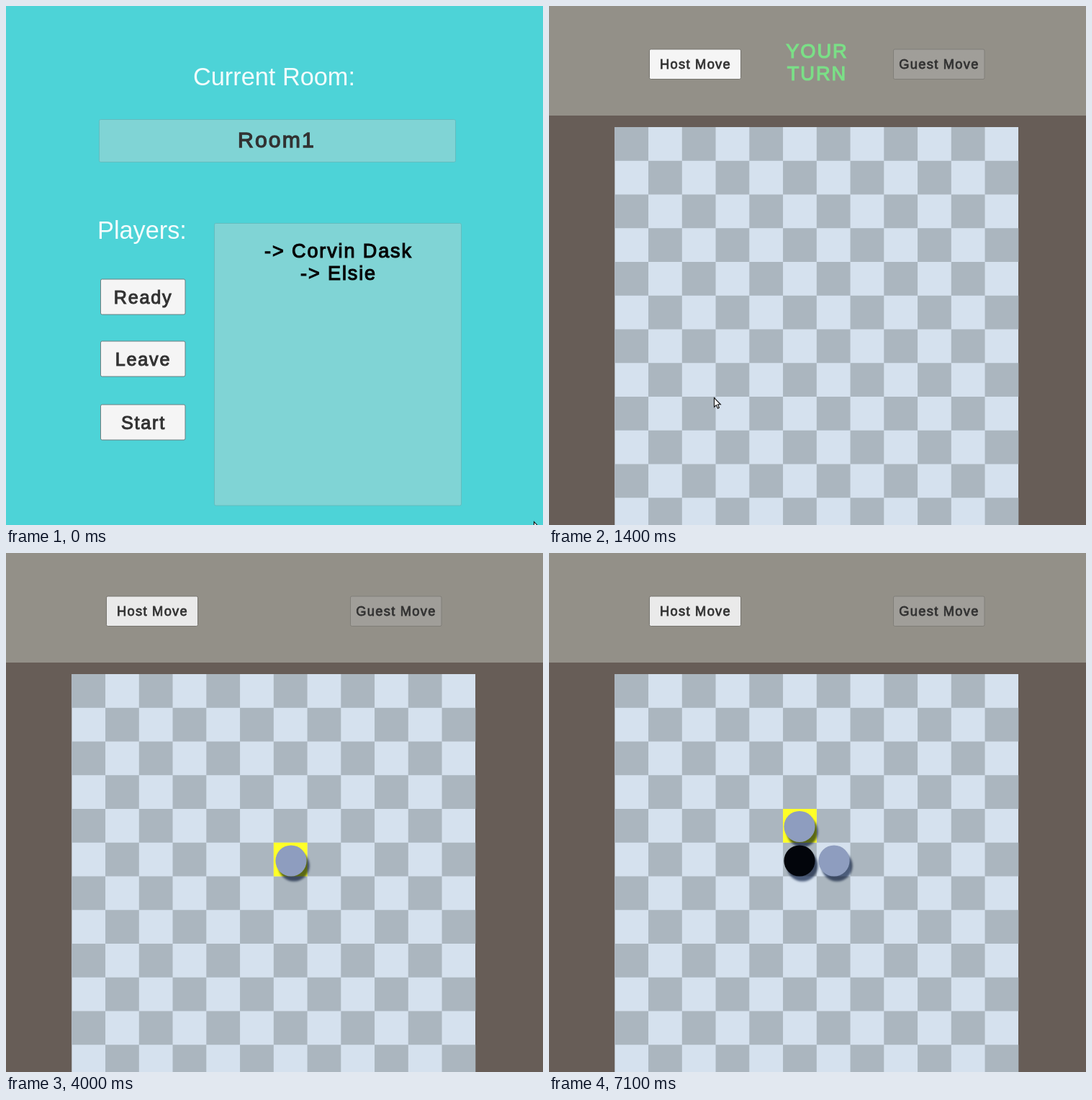
An HTML page that plays this animation: 746 px wide and 720 px high, repeating every 7.2 s.

```html
<!DOCTYPE html>
<html lang="en">
<head>
<meta charset="utf-8">
<title>Room and board</title>
<style>
  html, body { margin: 0; width: 100%; height: 100%; overflow: hidden; background: #4dd3d7; }
  svg { display: block; width: 746px; height: 720px; }
  text { font-family: "Liberation Sans", Arial, sans-serif; }
  .title { font-size: 34.3px; fill: #f4fcfc; }
  .bold { text-anchor: middle; letter-spacing: .07em; fill: #323232; stroke: #323232; stroke-width: .042em; }
  .button { font-size: 25.2px; }
  .small { font-size: 18.3px; }
  .players { font-size: 27px; fill: #050505; stroke: #050505; }
  .turn { font-size: 27.3px; fill: #7be087; stroke: #7be087; }
  .panel { fill: #80d4d5; stroke: #63bcbe; }
  .key { fill: #f5f5f5; stroke: #6d7f80; }
  .board .key { stroke: #77756f; }
  .board .off { fill: #a09e99; stroke: #807e78; }
  .shadow { fill: #5a6883; mix-blend-mode: multiply; filter: blur(1.6px); }
</style>
</head>
<body>
<svg viewBox="0 0 746 720">
  <g id="lobby">
    <rect width="746" height="720" fill="#4dd3d7"/>
    <text class="title" x="260" y="110">Current Room:</text>
    <text class="title" x="127" y="323">Players:</text>
    <rect class="panel" x="129.5" y="157.5" width="495" height="59" rx="2"/>
    <text class="bold" x="376" y="196" font-size="30.2">Room1</text>
    <rect class="panel" x="289.5" y="301.5" width="343" height="391.5" rx="2"/>
    <text class="bold players" x="462" y="349">-&gt; Corvin Dask</text>
    <text class="bold players" x="462" y="380">-&gt; Elsie</text>
    <rect class="key" x="131.5" y="379" width="117.5" height="49" rx="2"/>
    <text class="bold button" x="190.5" y="412.5">Ready</text>
    <rect class="key" x="131.5" y="465" width="117.5" height="49" rx="2"/>
    <text class="bold button" x="190.5" y="498.5">Leave</text>
    <rect class="key" id="start" x="131.5" y="553" width="117.5" height="49" rx="2"/>
    <text class="bold button" x="191" y="586.5">Start</text>
  </g>
  <g id="game" class="board">
    <rect width="746" height="720" fill="#675d57"/>
    <rect width="746" height="152" fill="#939088"/>
    <rect class="key" id="host" x="139.5" y="60" width="127" height="41.5" rx="2"/>
    <text class="bold small" x="203.5" y="87">Host Move</text>
    <rect class="key off" x="478.5" y="60" width="126.5" height="41.5" rx="2"/>
    <text class="bold small" x="542" y="87">Guest Move</text>
    <g id="turn">
      <text class="bold turn" x="372.5" y="71.5">YOUR</text>
      <text class="bold turn" x="372.5" y="102.5">TURN</text>
    </g>
    <rect x="91.3" y="168" width="560.7" height="552" fill="#d5e1ee"/>
    <path id="darkCells" fill="#abb6bf"/>
    <rect id="pick" width="46.8" height="46.8" fill="#ffff28"/>
    <g id="shadows"></g>
    <g id="pieces"></g>
  </g>
  <path id="cursor" d="M.5 .5V13.2L3.4 10.6L5.4 15.2L7.4 14.3L5.5 9.8H9.4Z" fill="#fff" stroke="#111" stroke-width="1.1"/>
</svg>
<script>
  const LOOP = 7200, STEP = 100, CELL = 46.75, LEFT = 91.3, TOP = 168;
  const $ = id => document.getElementById(id);
  const show = (el, on) => el.style.display = on ? "" : "none";
  const within = (t, ...spans) => spans.some(([from, to]) => t >= from && t < to);

  const addDisc = (parent, attrs) => {
    const disc = document.createElementNS("http://www.w3.org/2000/svg", "circle");
    for (const key in attrs) disc.setAttribute(key, attrs[key]);
    return $(parent).appendChild(disc);
  };

  let cells = "";
  for (let row = 0; row < 12; row++)
    for (let col = row % 2; col < 12; col += 2)
      cells += `M${LEFT + col * CELL} ${TOP + row * CELL}h${CELL}v${CELL}h${-CELL}z`;
  $("darkCells").setAttribute("d", cells);

  const pieces = [
    { cx: 396, cy: 427, fill: "#8e9dbf", born: 3200 },
    { cx: 348, cy: 427, fill: "#02050b", born: 4700 },
    { cx: 348, cy: 379.5, fill: "#8e9dbf", born: 6400 }
  ].map(({ cx, cy, fill, born }) => ({
    born,
    disc: addDisc("pieces", { cx, cy, fill, r: 21.6 }),
    shadow: addDisc("shadows", { cx, cy, r: 21.6, class: "shadow" })
  }));

  // Each visit is a list of [ms, x, y]; the pointer is hidden between visits.
  const visits = [
    [[0, 733, 715], [800, 300, 610], [1000, 211, 574], [1300, 211, 574], [1400, 229, 543],
     [1600, 270, 478], [2300, 377, 432], [2500, 377, 432], [3000, 195, 82], [3200, 195, 82], [3500, 55, 350]],
    [[5000, 136, 440], [5300, 336, 397], [5500, 343, 378], [5700, 343, 378],
     [6200, 195, 82], [6500, 195, 82], [7000, 64, 352]]
  ];

  function pointerAt(t) {
    const path = visits.find(v => t >= v[0][0] && t <= v[v.length - 1][0]);
    if (!path) return null;
    const next = Math.max(1, path.findIndex(p => p[0] >= t));
    const [t0, x0, y0] = path[next - 1], [t1, x1, y1] = path[next];
    const u = (t - t0) / (t1 - t0);
    return [x0 + (x1 - x0) * u, y0 + (y1 - y0) * u];
  }

  function draw(now) {
    const t = Math.floor(now % LOOP / STEP) * STEP;
    show($("lobby"), t < 1400);
    show($("game"), t >= 1400);
    $("start").style.fill = within(t, [1200, 1400]) ? "#cccccc" : "";
    $("host").style.fill = within(t, [3100, 3200], [6300, 6400]) ? "#c8c8c8" : t >= 3200 ? "#eaeaea" : "";
    show($("turn"), within(t, [1400, 3200], [4700, 6400]));

    show($("pick"), t >= 2500);
    const [col, row] = t < 5600 ? [6, 5] : [5, 4];
    $("pick").setAttribute("x", LEFT + col * CELL);
    $("pick").setAttribute("y", TOP + row * CELL);

    for (const { born, disc, shadow } of pieces) {
      show(disc, t >= born);
      show(shadow, t >= born);
      // The shadow closes in as the piece falls to the board.
      const height = 1 - Math.min(1, Math.max(0, (t - born) / 400)) ** 2;
      shadow.setAttribute("transform", `translate(${4 + 15 * height} ${7 + 25 * height})`);
    }

    const at = pointerAt(t);
    show($("cursor"), at);
    if (at) $("cursor").setAttribute("transform", `translate(${at})`);
  }

  function tick(now) {
    draw(now);
    requestAnimationFrame(tick);
  }
  draw(0);
  requestAnimationFrame(tick);
</script>
</body>
</html>
```
